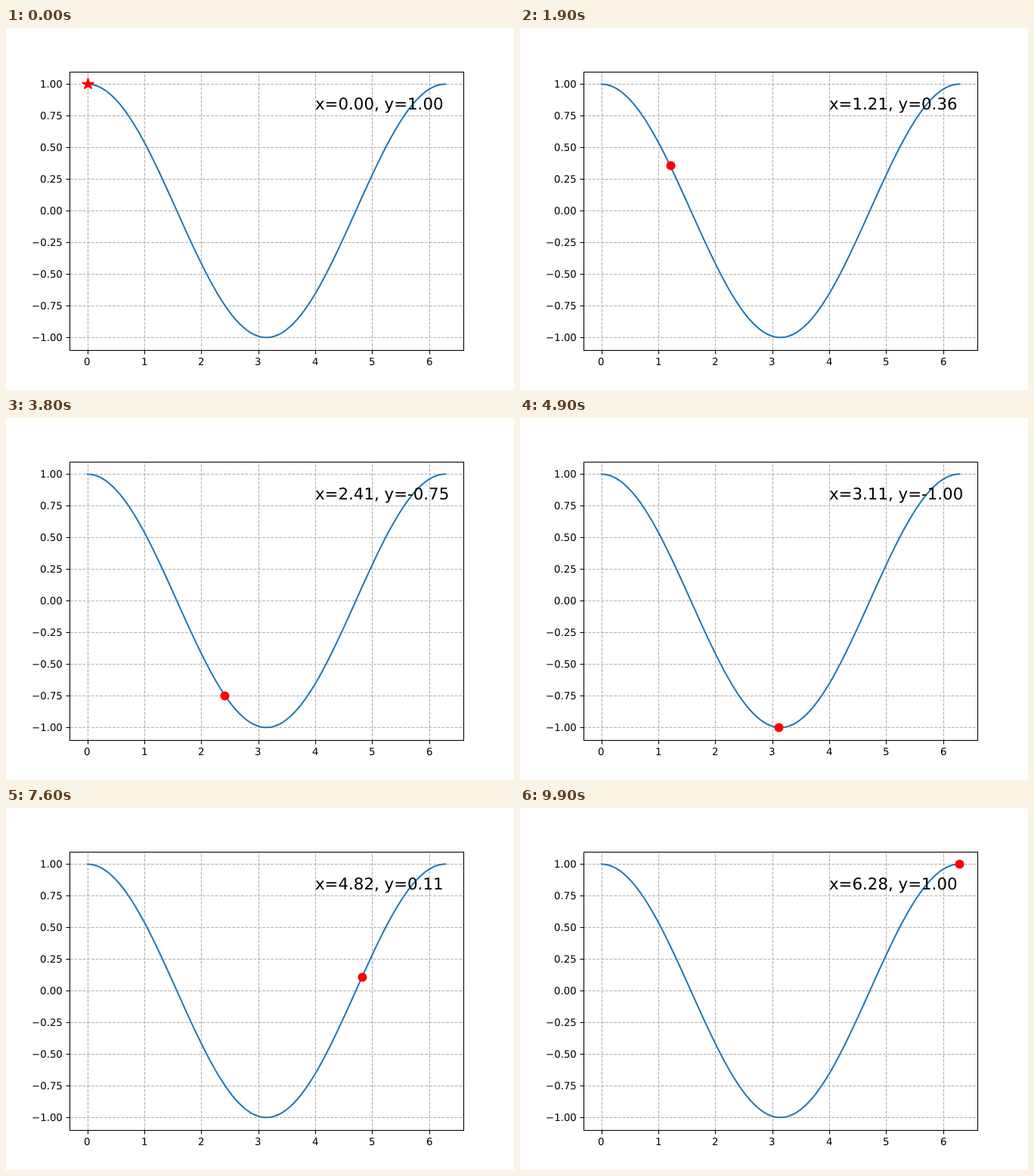
These frames come from a looping animation (672 by 480 pixels, 10 s). An HTML page with a canvas:

```html
<!DOCTYPE html>
<html lang="en">
<head>
<meta charset="utf-8">
<title>Cosine</title>
<style>
  html, body { margin: 0; width: 100%; height: 100%; overflow: hidden; background: #fff; }
  canvas { display: block; }
</style>
</head>
<body>
<canvas id="plot" width="672" height="480"></canvas>
<script>
const ctx = document.getElementById('plot').getContext('2d');
const COUNT = 100, STEP_MS = 100;
const LEFT = 84.5, RIGHT = 605.5, TOP = 58.5, BOTTOM = 427.5;

// Data to pixels: the x axis has a 5% margin on each side of 0..2π
const SCALE_X = 520.8 / (2.2 * Math.PI);
const px = x => 84 + (x + 0.1 * Math.PI) * SCALE_X;
const py = y => 242.4 - 168 * y;
const snap = v => Math.round(v) + 0.5;
const xAt = i => 2 * Math.PI * i / (COUNT - 1);

const xTicks = [0, 1, 2, 3, 4, 5, 6];
const yTicks = Array.from({ length: 9 }, (_, k) => 1 - k / 4);

// Right half of the star, from the top tip to the bottom notch
const half = [[0, -8], [2, -2], [8, -2], [3, 1], [5, 6], [0, 3]];
const star = [...half, ...half.slice(1, -1).reverse().map(([x, y]) => [-x, y])];

function trace(points) {
  ctx.beginPath();
  points.forEach(([x, y]) => ctx.lineTo(x, y));
}

function line(x1, y1, x2, y2) {
  trace([[x1, y1], [x2, y2]]);
  ctx.stroke();
}

function setFont(size) {
  ctx.font = `${size}px "DejaVu Sans", sans-serif`;
  ctx.textRendering = 'geometricPrecision';
}

// align: 0.5 centres the label on x, 1 ends it there
function label(text, x, y, align) {
  ctx.fillText(text, Math.round(x - align * ctx.measureText(text).width), y);
}

function drawGrid() {
  ctx.lineWidth = 0.8 * 4 / 3;
  ctx.lineCap = 'butt';
  ctx.strokeStyle = '#b0b0b0';
  ctx.setLineDash([3.947, 1.707]);
  for (const x of xTicks) line(snap(px(x)), BOTTOM, snap(px(x)), TOP);
  for (const y of yTicks) line(LEFT, snap(py(y)), RIGHT, snap(py(y)));
  ctx.setLineDash([]);
}

function drawCurve() {
  ctx.strokeStyle = '#1f77b4';
  ctx.lineWidth = 2;
  ctx.lineCap = 'square';
  ctx.lineJoin = 'round';
  trace(Array.from({ length: COUNT }, (_, i) => [px(xAt(i)), py(Math.cos(xAt(i)))]));
  ctx.stroke();
}

function drawMarker(i) {
  const cx = snap(px(xAt(i))), cy = snap(py(Math.cos(xAt(i))));
  ctx.fillStyle = ctx.strokeStyle = '#f00';
  if (i % 5) {
    ctx.beginPath();
    ctx.arc(cx, cy, 6, 0, 2 * Math.PI);
    ctx.fill();
    return;
  }
  ctx.lineWidth = 4 / 3;
  ctx.lineJoin = 'bevel';
  trace(star.map(([x, y]) => [cx + x, cy + y]));
  ctx.closePath();
  ctx.fill();
  ctx.stroke();
}

function drawAxes() {
  ctx.fillStyle = ctx.strokeStyle = '#000';
  ctx.lineWidth = 0.8 * 4 / 3;
  ctx.lineCap = 'butt';
  ctx.lineJoin = 'miter';
  setFont(40 / 3);
  for (const x of xTicks) {
    line(snap(px(x)), BOTTOM, snap(px(x)), BOTTOM + 5);
    label(String(x), px(x), 447, 0.5);
  }
  for (const y of yTicks) {
    line(LEFT, snap(py(y)), LEFT - 5, snap(py(y)));
    label(y.toFixed(2).replace('-', '\u2212'), 74.67, Math.round(py(y)) + 5, 1);
  }
  ctx.strokeRect(LEFT, TOP, RIGHT - LEFT, BOTTOM - TOP);
}

function drawReadout(i) {
  const x = xAt(i);
  setFont(64 / 3);
  ctx.fillText(`x=${x.toFixed(2)}, y=${Math.cos(x).toFixed(2)}`, 409, 108);
}

function draw(now) {
  const i = Math.floor(now / STEP_MS) % COUNT;
  ctx.fillStyle = '#fff';
  ctx.fillRect(0, 0, 672, 480);
  drawGrid();
  drawCurve();
  drawMarker(i);
  drawAxes();
  drawReadout(i);
}

const start = performance.now();
function tick() {
  draw(performance.now() - start);
  requestAnimationFrame(tick);
}
tick();
</script>
</body>
</html>
```
